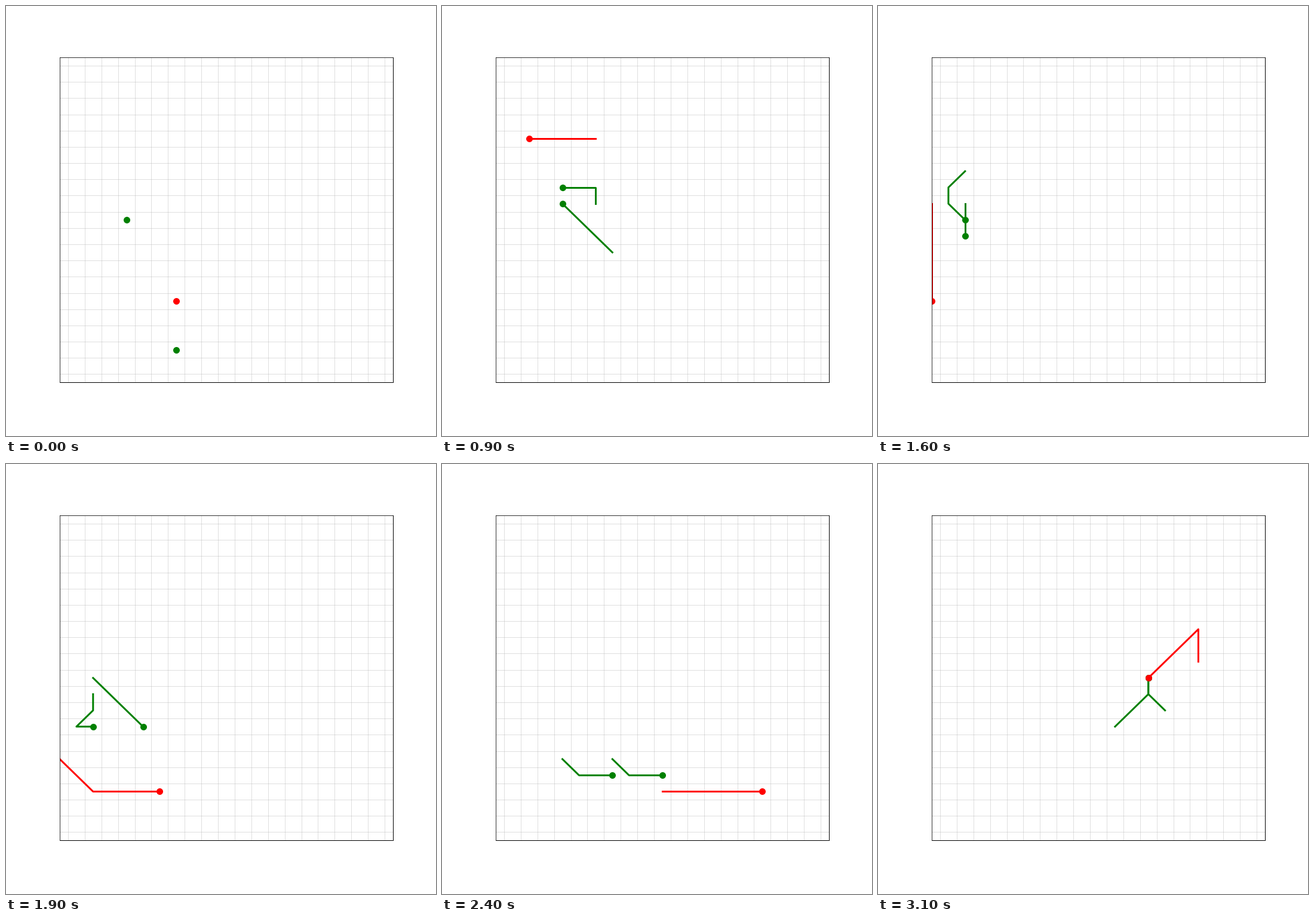
Animation, 720 px wide and 720 px high, one loop 3200 ms. Source, as a matplotlib script:

```python
import numpy as np
import matplotlib.pyplot as plt
from matplotlib.animation import FuncAnimation

CELLS, STEPS, TAIL = 20, 32, 4
GAP = 2  # a hunter waits while the prey is exactly this far away


def roam(start, goals, speed, prey=None):
    """Head for each goal in turn, like a chess king; a repeated goal is a rest."""
    path, queue = [np.array(start)], list(goals)
    for step in range(1, STEPS):
        pos = path[-1]
        waits = prey is not None and abs(prey[step] - pos).max() == GAP
        if queue and not waits:
            pos = pos + np.clip(queue[0] - pos, -speed, speed)
            if tuple(pos) == queue[0]:
                queue.pop(0)
        path.append(pos)
    return np.array(path)


meet = (13, 10)
prey = roam((7, 5), [(9, 11), (6, 15), (6, 15), (2, 15), (2, 15), (0, 15),
                     (0, 15), (0, 5), (16, 3), (16, 13), (15, 12), meet], 2)
hunter_a = roam((4, 10), [(6, 8), (7, 10), (7, 10), (6, 12), (4, 12), (2, 13),
                          (1, 11), (7, 5), (10, 4), (14, 8), meet], 1, prey)
hunter_b = roam((7, 2), [(6, 3), (9, 6), (4, 11), (2, 11), (2, 8), (1, 7),
                         (2, 7), (4, 5), (7, 4), (8, 5), (9, 5), meet], 1, prey)

fig, ax = plt.subplots(figsize=(10, 10), dpi=72)
fig.subplots_adjust(left=0.125, right=0.9, bottom=0.125, top=0.88)
ax.set(xlim=(0, CELLS), ylim=(0, CELLS))
ticks = np.arange(CELLS) + 0.5
ax.set_xticks(ticks)
ax.set_yticks(ticks)
ax.tick_params(length=0, labelbottom=False, labelleft=False)
ax.grid(alpha=0.5)
ax.spines[["right", "bottom"]].set_linewidth(1)

agents = []
for path, color in [(hunter_a, "green"), (hunter_b, "green"), (prey, "red")]:
    trail, = ax.plot([], [], color=color, lw=3)
    dot, = ax.plot([], [], "o", color=color, ms=10)
    agents.append((path, trail, dot))


def draw(step):
    for path, trail, dot in agents:
        recent = path[max(0, step - TAIL + 1):step + 1]
        trail.set_data(recent.T if step else ([], []))
        dot.set_data(path[step:step + 1].T)
    return [part for agent in agents for part in agent[1:]]


anim = FuncAnimation(fig, draw, frames=STEPS, interval=100,
                     init_func=lambda: draw(0), repeat=True, repeat_delay=0)
plt.show()
```
